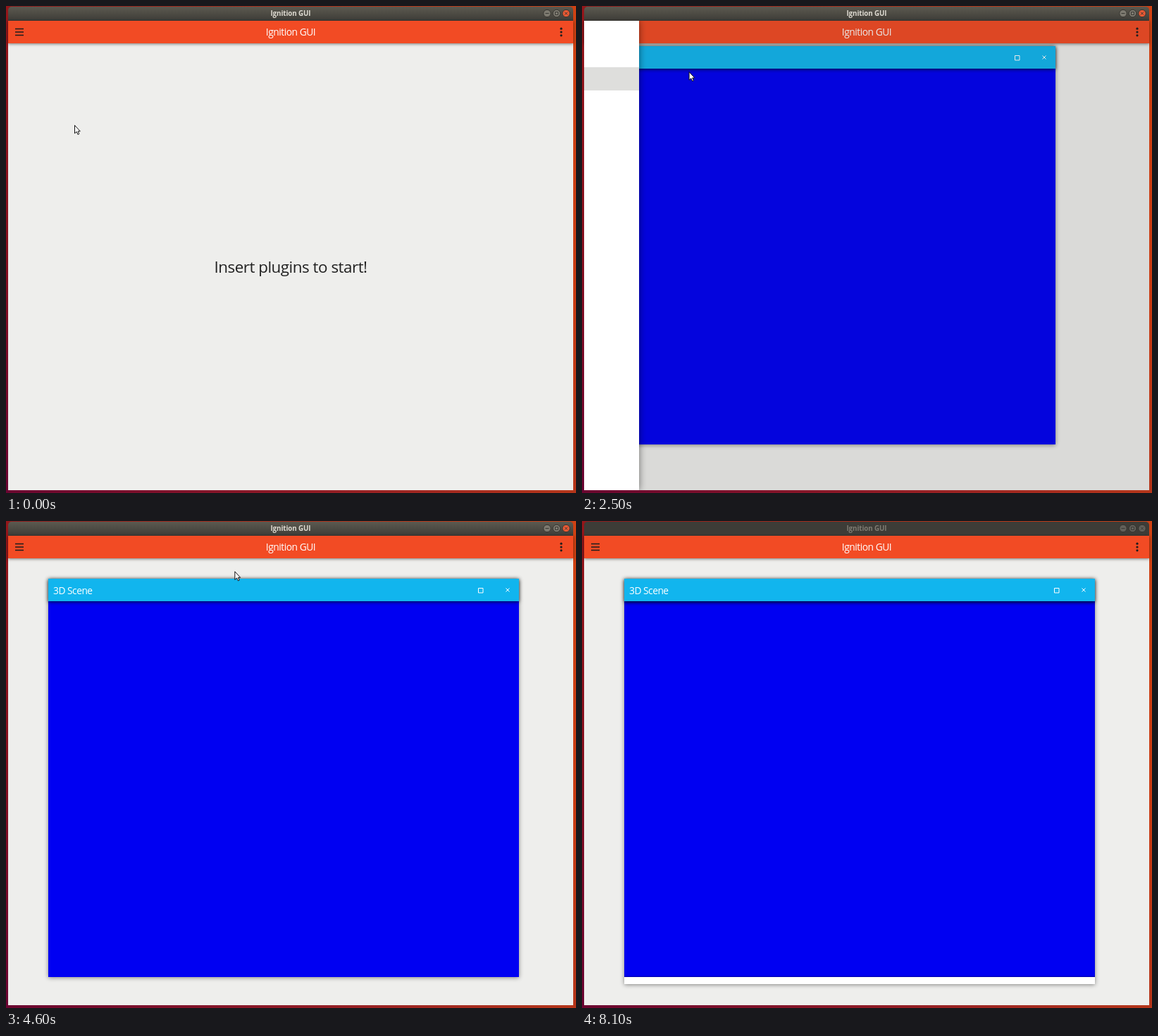
Animation, 809 px wide and 692 px high, one loop 8.2 s. Source, as an HTML page:

```html
<!DOCTYPE html>
<html lang="en">
<head>
<meta charset="utf-8">
<title>Plugin window demo</title>
<style>
html, body { margin: 0; width: 100%; height: 100%; overflow: hidden; }
body { font-family: "Open Sans", "Noto Sans", sans-serif; letter-spacing: -.03em; }
div, svg { position: absolute; box-sizing: border-box; }
svg { overflow: visible; }

#stage {
  left: 0; top: 0; width: 809px; height: 692px; overflow: hidden;
  background: linear-gradient(90deg, #6b0630, #8e1a26 50%, #b5361a);
}
#left { left: 0; top: 0; width: 3px; height: 692px; background: linear-gradient(#94161a, #86101f 50%, #6a0432); }
#right { left: 805px; top: 0; width: 4px; height: 692px; background: linear-gradient(#cf4213, #c93c14 60%, #b4351a); }
#top { left: 0; top: 0; width: 809px; height: 8px; background: linear-gradient(90deg, #8c1a1c, #c44016); }

#bar {
  left: 3px; top: 1px; width: 802px; height: 20px; border-radius: 5px 5px 0 0;
  background: linear-gradient(#5c5a50, #3d3c37); color: #dfdbd2;
  font: 700 9.8px/19px "Open Sans", "Noto Sans", sans-serif; letter-spacing: -.01em; text-align: center;
}
#bar svg { left: 0; top: 0; }
#bar circle { fill: #7d7a70; stroke: #35342f; }
#bar .close { fill: #ec5a34; }
#bar path { fill: none; stroke: #3a3934; }
.inactive #bar { background: #3d3c37; color: #7f7c73; }
.inactive #bar circle, .inactive #bar .close { fill: #62605a; }

#tools {
  left: 3px; top: 21px; width: 802px; height: 32px; background: #f24b24; color: #fff;
  font-size: 13.8px; line-height: 32px; text-align: center; box-shadow: 0 1px 4px rgba(0, 0, 0, .5);
}
#tools svg { left: 0; top: 0; }
#main { left: 3px; top: 53px; width: 802px; height: 635px; overflow: hidden; background: #eeeeec; }
#hint { width: 100%; top: 0; line-height: 635px; font-size: 22.4px; text-align: center; color: #212121; }

#card { left: 0; top: 0; width: 668px; background: #fff; box-shadow: 0 1px 6px rgba(0, 0, 0, .45); }
#view { top: 32px; width: 668px; height: 534px; background: #0000f2; }
#card.settled #view { box-shadow: inset 0 5px 5px -3px #00009a, inset 0 -2px 2px -1px #0000a0; }
#head {
  width: 668px; height: 32px; background: #11b5ee; color: #fff;
  font-size: 13.75px; line-height: 33px; padding-left: 7px; box-shadow: 0 1px 5px rgba(0, 0, 0, .75);
}
#head svg { left: 0; top: 0; fill: none; stroke: #fff; }

#overlay { left: 3px; top: 20.5px; width: 802px; height: 667.5px; overflow: hidden; }
#scrim { width: 100%; height: 100%; background: rgba(45, 45, 45, .59); }
#drawer { left: 0; top: 0; width: 445px; height: 100%; background: #fff; box-shadow: 0 0 10px rgba(0, 0, 0, .5); }
#drawer div {
  width: 100%; height: 33px; padding-left: 10px; color: #212121;
  font-size: 9.4px; font-weight: 700; line-height: 33px;
}
#arrow, #resize { left: 0; top: 0; fill: #fff; stroke: #111; }
</style>
</head>
<body>
<div id="stage">
  <div id="top"></div><div id="left"></div><div id="right"></div>
  <div id="bar">Ignition GUI
    <svg width="802" height="20">
      <circle cx="765" cy="9.5" r="5.2"/><circle cx="778.5" cy="9.5" r="5.2"/><circle class="close" cx="792" cy="9.5" r="5.2"/>
      <path d="M762.5 9.5h5M776.5 7.5h4v4h-4zM790 7.5l4 4m0-4l-4 4"/>
    </svg>
  </div>
  <div id="main">
    <div id="hint">Insert plugins to start!</div>
    <div id="card">
      <div id="view"></div>
      <div id="head">3D Scene
        <svg width="668" height="32"><path d="M610.5 13.5h6.500v6.500h-6.500zM649.500 13.500l5 5m0-5l-5 5"/></svg>
      </div>
    </div>
  </div>
  <div id="tools">Ignition GUI
    <svg width="802" height="32">
      <path d="M10 11.500h12M10 16h12M10 20.500h12" stroke="#1d1d1d" stroke-width="1.600"/>
      <g fill="#1d1d1d"><circle cx="785" cy="11.200" r="1.600"/><circle cx="785" cy="16" r="1.600"/><circle cx="785" cy="20.800" r="1.600"/></g>
    </svg>
  </div>
  <div id="overlay">
    <div id="scrim"></div>
    <div id="drawer">
      <div style="top:0">Publisher</div><div style="top:33px">TopicEcho</div><div style="top:66px">Scene3D</div>
    </div>
  </div>
  <svg id="arrow" width="10" height="16"><path d="M.5 .5V12L3.200 9.600L5 13.600L6.800 12.800L5.100 9H8.300Z"/></svg>
  <svg id="resize" width="10" height="16"><path d="M0-7.500L4-3H1.500V3H4L0 7.500L-4 3H-1.500V-3H-4Z" stroke-width="1.200"/></svg>
</div>
<script>
const LOOP = 8200, TICK = 100;
const $ = id => document.getElementById(id);
const rows = $('drawer').children;

// Each track: [ms, value, ...], linear between stops.
const pointer = [
  [0, 97, 169], [300, 58, 108], [600, 18, 38], [700, 15, 33], [1100, 15, 33],
  [1400, 50, 72], [1600, 65, 96], [2300, 65, 96], [3000, 368, 86], [3100, 371, 88],
  [3200, 371, 88], [3800, 471, 126], [3900, 454, 110], [4100, 430, 84], [4300, 437, 70],
  [4400, 437, 70], [4700, 268, 72], [4800, 268, 72], [5100, 258, 90], [5300, 256, 86],
  [5400, 256, 86], [5500, 260, 93], [5600, 260, 93], [5800, 261, 145], [6000, 262, 165],
  [6300, 268, 77], [6500, 280, 128], [6600, 286, 114], [6900, 300, 72], [7300, 300, 72],
  [7700, 420, -20]
];
const card = [
  [3200, 4, 57], [3800, 94, 112], [3900, 77, 96], [4100, 53, 72], [4300, 60, 82],
  [5600, 60, 82], [5800, 60, 128], [6000, 60, 150], [6300, 60, 60], [6500, 60, 128],
  [6600, 60, 123], [6900, 60, 82]
];
const drawer = [
  [800, 0], [900, .15], [1000, .55], [1100, .85], [1300, 1],
  [2200, 1], [2300, .75], [2400, .35], [2600, 0]
];

function at(track, t) {
  const i = track.findIndex(stop => stop[0] > t);
  if (i === 0) return track[0].slice(1);
  if (i < 0) return track[track.length - 1].slice(1);
  const a = track[i - 1], b = track[i], k = (t - a[0]) / (b[0] - a[0]);
  return a.slice(1).map((v, n) => v + (b[n + 1] - v) * k);
}

const move = (el, x, y) => el.style.transform = `translate(${x}px, ${y}px)`;
const show = (el, on) => el.style.visibility = on ? 'visible' : 'hidden';

function rowColor(i, t) {
  const [from, to] = [[1000, 1300], [1300, 1600], [1600, 2700]][i];
  if (t >= from && t < to) return i === 2 && t >= 2200 ? '#dededc' : '#eeeeec';
  return i === 1 && t === 1600 ? '#fafaf8' : '#fff';
}

function draw(t) {
  const [px, py] = at(pointer, t);
  const resizing = t >= 5500 && t < 6600;
  move($('arrow'), px, py);
  move($('resize'), px, py);
  show($('arrow'), !resizing);
  show($('resize'), resizing);

  const [x, y] = at(card, t);
  const bottom = t < 5700 ? y + 566 : 658;
  move($('card'), Math.round(x) - 3, Math.round(y) - 53);
  $('card').style.height = Math.round(bottom - y) + 'px';
  $('card').classList.toggle('settled', t >= 6900);
  show($('card'), t >= 2500);

  const [open] = at(drawer, t);
  show($('overlay'), open > 0);
  $('scrim').style.opacity = open;
  move($('drawer'), Math.round(445 * (open - 1)), 0);
  for (let i = 0; i < 3; i++) rows[i].style.background = rowColor(i, t);

  $('stage').classList.toggle('inactive', t >= 8100);
}

const start = performance.now();
function loop() {
  const t = (performance.now() - start) % LOOP;
  draw(Math.floor(t / TICK) * TICK);
  requestAnimationFrame(loop);
}
loop();
</script>
</body>
</html>
```
